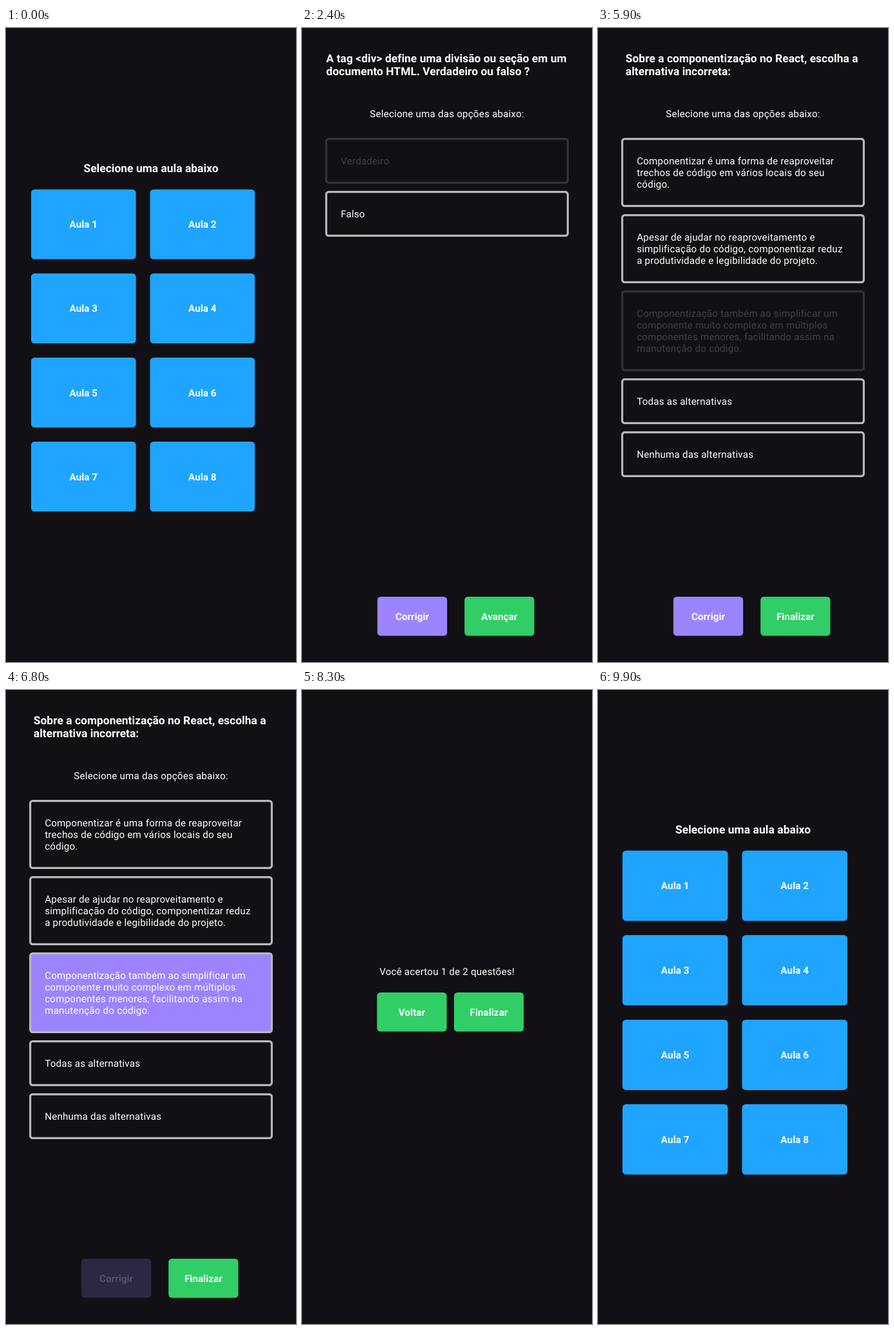
An HTML page that plays this animation: 450x981 px, repeating every 10 s.

```html
<!DOCTYPE html>
<html lang="pt">
<head>
<meta charset="utf-8">
<style>
  html, body { margin: 0; width: 100%; height: 100%; overflow: hidden; background: #121014; }
  svg { display: block; width: 450px; height: 981px; }
  text { font: 15.17px Roboto, sans-serif; letter-spacing: .2px; fill: #fff; text-rendering: geometricPrecision; }
  .bold, .title { font-weight: 700; letter-spacing: .06px; }
  .title { font-size: 17.33px; }
  .mid { text-anchor: middle; }
</style>
</head>
<body>
<svg id="stage" viewBox="0 0 450 981"></svg>
<script>
const LOOP = 10000, STEP = 100;
const BG = '#121014', BLUE = '#1fa4ff', PURPLE = '#9c84ff', GREEN = '#31ce67', RED = '#e6063c', GREY = '#b8b7ba';
const stage = document.getElementById('stage');

const questions = [
  {
    x: 37.6,
    title: ['A tag &lt;div&gt; define uma divisão ou seção em um', 'documento HTML. Verdadeiro ou falso ?'],
    options: [['Verdadeiro'], ['Falso']],
    picked: 0, press: 2400, pickAt: 2440, gradeAt: 3640, grade: GREEN, next: 'Avançar'
  },
  {
    x: 42.8,
    title: ['Sobre a componentização no React, escolha a', 'alternativa incorreta:'],
    options: [
      ['Componentizar é uma forma de reaproveitar', 'trechos de código em vários locais do seu', 'código.'],
      ['Apesar de ajudar no reaproveitamento e', 'simplificação do código, componentizar reduz', 'a produtividade e legibilidade do projeto.'],
      ['Componentização também ao simplificar um', 'componente muito complexo em múltiplos', 'componentes menores, facilitando assim na', 'manutenção do código.'],
      ['Todas as alternativas'],
      ['Nenhuma das alternativas']
    ],
    picked: 2, press: 5900, pickAt: 5940, gradeAt: 6940, grade: RED, next: 'Finalizar'
  }
];

const clamp = v => Math.min(1, Math.max(0, v));
const bezier = (a, b, c, d, u) => {
  const v = 1 - u;
  return a * v * v * v + 3 * b * v * v * u + 3 * c * v * u * u + d * u * u * u;
};

// Fast start, very long tail: two joined cubic curves
function glide(x) {
  if (x <= 0 || x >= 1) return clamp(x);
  const [xs, ys] = x < 1 / 6
    ? [[0, 0.05, 0.1333, 1 / 6], [0, 0, 0.06, 0.4]]
    : [[1 / 6, 0.2083, 0.25, 1], [0.4, 0.82, 1, 1]];
  let lo = 0, hi = 1;
  for (let i = 0; i < 24; i++) {
    const u = (lo + hi) / 2;
    if (bezier(...xs, u) < x) lo = u; else hi = u;
  }
  return bezier(...ys, lo);
}

// Opacity of a touched control: dims at once, eases back after release
function touch(t, down, up) {
  if (t < down) return 1;
  const p = clamp((t - up) / 250);
  return 0.2 + 0.8 * (p < 0.5 ? 2 * p * p : 1 - 2 * (1 - p) * (1 - p));
}

const text = (x, y, s, cls = '') => `<text x="${x}" y="${y}" class="${cls}">${s}</text>`;

// Each shape fades by itself, so a label stays legible over its dimmed box
const fade = (a, body) => `<g fill-opacity="${a}" stroke-opacity="${a}">${body}</g>`;

function button(x, y, w, h, color, label, opacity = 1) {
  return fade(opacity,
    `<rect x="${x}" y="${y}" width="${w}" height="${h}" rx="5.4" fill="${color}"/>` +
    text(x + w / 2, y + h / 2 + 5.5, label, 'bold mid'));
}
const action = (x, y, color, label, opacity) => button(x, y, 108.3, 60.6, color, label, opacity);

function lessons(t) {
  let out = text(225, 223, 'Selecione uma aula abaixo', 'title mid');
  for (let i = 0; i < 8; i++) {
    const x = 39 + (i % 2) * 184.5, y = 249.7 + (i >> 1) * 130.1;
    out += button(x, y, 162.6, 108.2, BLUE, 'Aula ' + (i + 1), i ? 1 : touch(t, 1000, 1140));
  }
  return out;
}

function option(y, lines, fill, opacity) {
  const h = 53 + 18 * lines.length;
  return fade(opacity,
    `<rect x="37.6" y="${y + 1.6}" width="374.8" height="${h - 3.2}" rx="3.8" fill="${fill}" stroke="${GREY}" stroke-width="3.2"/>` +
    lines.map((s, i) => text(60.2, y + 40.7 + i * 18, s)).join(''));
}

function quiz(t) {
  const second = t >= 4540, q = questions[+second];
  let out = q.title.map((s, i) => text(q.x, 53 + i * 20.3, s, 'title')).join('');
  out += text(225, 138.4, 'Selecione uma das opções abaixo:', 'mid');
  let y = 170;
  q.options.forEach((lines, i) => {
    const mine = i === q.picked;
    const fill = !mine || t < q.pickAt ? 'none' : t < q.gradeAt ? PURPLE : q.grade;
    out += option(y, lines, fill, mine ? touch(t, q.press, q.pickAt) : 1);
    y += 64 + 18 * lines.length;
  });
  const check = second ? touch(t, 6800, 6940) : touch(t, 3600, 3640);
  const next = t < 7900 ? touch(t, 4500, 4540) : touch(t, 7900, 8040);
  return out + action(116.9, 880, PURPLE, 'Corrigir', check) + action(252.2, 880, GREEN, q.next, next);
}

function result(t) {
  return text(225, 441.4, 'Você acertou 1 de 2 questões!', 'mid') +
    action(116.3, 468, GREEN, 'Voltar') +
    action(235.9, 468, GREEN, 'Finalizar', touch(t, 9700, 9740));
}

function screen(body, scale = 1, opacity = 1) {
  return `<g opacity="${opacity}" transform="translate(225 466) scale(${scale}) translate(-225 -466)">` +
    `<rect y="-50" width="450" height="1100" fill="${BG}"/>${body}</g>`;
}

function open(ms, from, to) {
  const p = glide(ms / 300), shown = clamp((ms - 40) / 110);
  return (shown < 1 ? screen(from, 1 + 0.15 * p) : '') + screen(to, 0.85 + 0.15 * p, shown);
}

function close(ms, from, to) {
  const p = glide(ms / 300);
  return screen(to, 1.15 - 0.15 * p) + screen(from, 1 - 0.15 * p, 1 - clamp((ms - 35) / 83));
}

function draw(t) {
  if (t < 1162) return close(t + 265, '', lessons(t));
  if (t < 1500) return open(t - 1162, lessons(t), quiz(t));
  if (t < 8062) return screen(quiz(t));
  if (t < 8400) return open(t - 8062, quiz(t), result(t));
  if (t < 9735) return screen(result(t));
  return close(t - 9735, result(t), lessons(0));
}

let shown = -1;
function tick(now) {
  const t = Math.floor((now % LOOP) / STEP) * STEP;
  if (t !== shown) stage.innerHTML = draw(shown = t);
  requestAnimationFrame(tick);
}
tick(performance.now());
</script>
</body>
</html>
```
